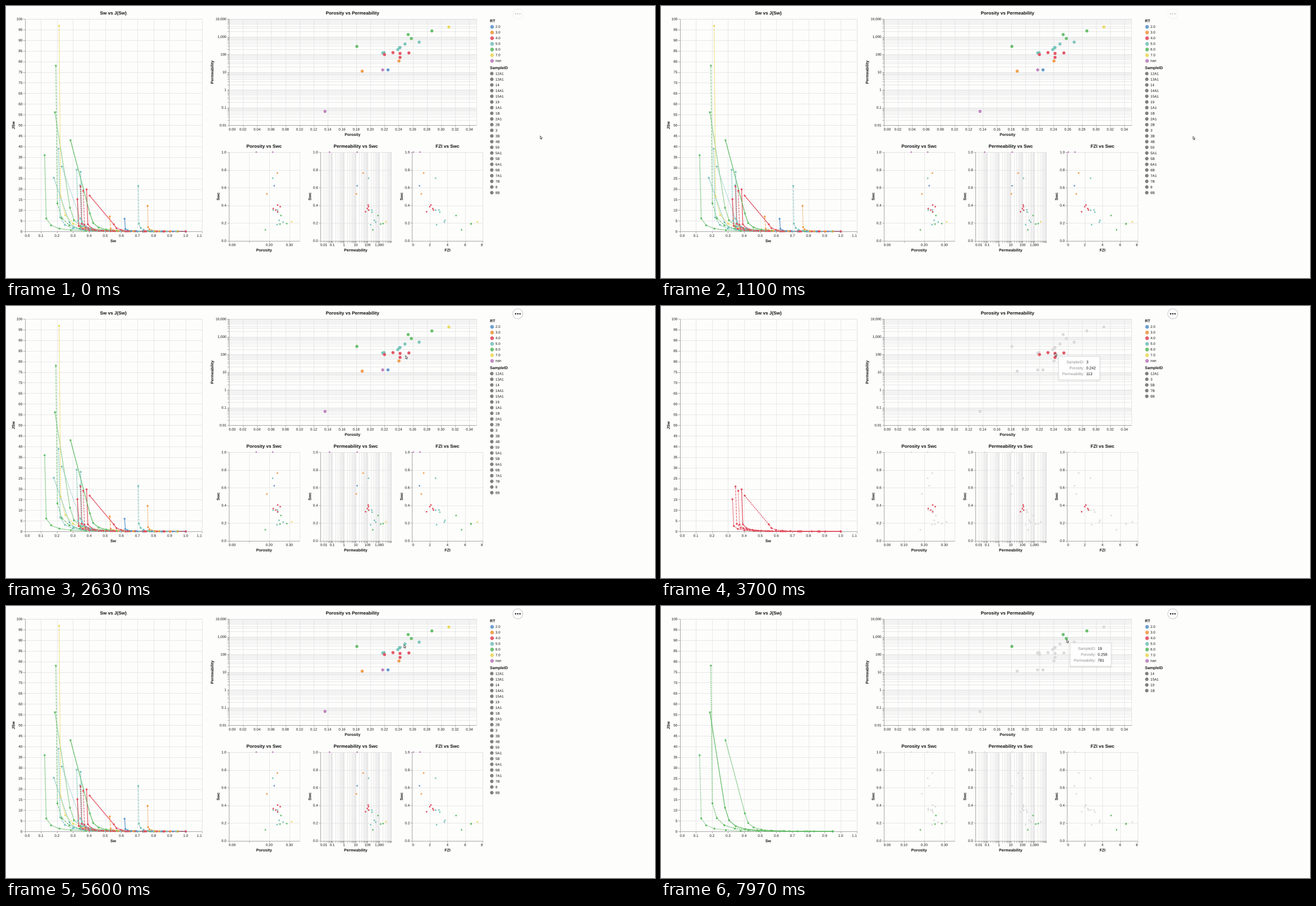
Recreate the animation shown at these times as a matplotlib script. Size 1156x484 px, loop 8000 ms.

```python
import math

import matplotlib.pyplot as plt
import numpy as np
from matplotlib.animation import FuncAnimation
from matplotlib.collections import PatchCollection
from matplotlib.patches import Circle, FancyBboxPatch, PathPatch, Polygon, Rectangle
from matplotlib.textpath import TextPath
from matplotlib.transforms import Affine2D

W, H, DPI = 1156, 484, 64
PX = 72 / DPI  # points per pixel
FRAMES, STEP = 200, 40
SCALE = 0.63  # chart units to pixels

plt.rcParams["lines.scale_dashes"] = False

COLORS = {"2.0": "#5f97cb", "3.0": "#f09a45", "4.0": "#e2505f", "5.0": "#78c4ba",
          "6.0": "#62bd66", "7.0": "#ecd95e", "nan": "#be82bd"}
MUTED = "#dadada"
DASHES = [(1, 0), (4, 2), (2, 1), (1, 1), (1, 2, 4, 2)]
SLANTED = {"3", "14", "19", "59", "4B"}  # curves without a vertical drop


class Sample:
    """A core plug; rock type and J curve follow from its three measurements."""

    def __init__(self, name, phi, perm, swc):
        self.name, self.phi, self.perm, self.swc = name, phi, perm, swc
        quality = math.sqrt(perm / phi)
        self.fzi = 0.0314 * quality * (1 - phi) / phi
        self.rt = "nan" if swc == 1 else f"{round(2 * math.log(self.fzi) + 10.6) - 8:.1f}"
        # Each pressure step roughly halves J while water fills the pores.
        k = np.arange(10)
        top = 0.78 if name.isdigit() else 0.912
        pressure = np.where(k == 0, top, 0.155 * 0.47 ** (k - 1.0))
        fill = (k / 9) ** 2
        if name in SLANTED:
            bend = 0.6 * swc
            fill = np.where(k == 0, 0, bend + (1 - bend) * fill)
        end = 0.95 if self.rt == "6.0" else 1
        self.sw = swc + (end - swc) * fill
        self.jsw = pressure * quality


SAMPLES = [
    Sample("12A1", .2545, 120, .384), Sample("13A1", .269, 490, .21),
    Sample("14", .2535, 1310, .187), Sample("14A1", .136, .06, 1),
    Sample("15A1", .287, 2100, .193), Sample("19", .258, 781, .284),
    Sample("1A1", .311, 3500, .213), Sample("1B", .181, 280, .123),
    Sample("2A1", .2175, 13.2, 1), Sample("2B", .1885, 11.2, .528),
    Sample("3", .242, 113, .403), Sample("3B", .242, 245, .322),
    Sample("4B", .2388, 183, .18), Sample("59", .249, 382, .23),
    Sample("5A1", .2175, 120, .705), Sample("5B", .242, 67, .327),
    Sample("6A1", .241, 228, .347), Sample("6B", .2195, 125, .344),
    Sample("7A1", .2405, 42, .763), Sample("7B", .22, 97, .363),
    Sample("8", .225, 13.2, .62), Sample("8B", .232, 125, .346),
]

fig = plt.figure(figsize=(W / DPI, H / DPI), dpi=DPI, facecolor="#fdfdfc")
ax = fig.add_axes((0, 0, 1, 1))


def clear_stage():
    ax.clear()
    ax.set(xlim=(0, W), ylim=(H, 0))
    ax.axis("off")


def label(x, y, text, size=6.3, ha="center", color="#111111", weight="normal",
          angle=0, zorder=5):
    """Outlined text with its capitals centred on y."""
    if not text:
        return
    path = TextPath((0, 0), text, size=size,
                    prop={"family": "Liberation Sans", "weight": weight})
    width = path.get_extents().x1 + 0.05 * size
    shift = {"left": 0, "center": width / 2, "right": width}[ha]
    place = (Affine2D().translate(-shift, -0.36 * size).scale(1, -1)
             .rotate_deg(-angle).translate(x, y))
    ax.add_patch(PathPatch(path, fc=color, lw=0, zorder=zorder, snap=False,
                           transform=place + ax.transData))


def heading(x, y, text, size=7, **style):
    label(x, y, text, size, weight="bold", **style)


def dots(xs, ys, radius, colors, edge="none", alpha=1, zorder=4):
    circles = [Circle(p, radius) for p in zip(np.atleast_1d(xs), np.atleast_1d(ys))]
    ax.add_collection(PatchCollection(circles, facecolors=colors, edgecolors=edge,
                                      linewidths=0.7 * PX, alpha=alpha, zorder=zorder))


def linear(top, step, fmt):
    count = int(top / step + 1e-6) + 1
    return [(k * step / top, fmt.format(k * step)) for k in range(count)]


def decades(last_label=True):
    ticks = [((d + 2 + math.log10(m)) / 6, f"{10.0 ** d:,g}" if m == 1 else "")
             for d in range(-2, 4) for m in range(1, 10)]
    return ticks + [(1, "10,000" if last_label else "")]


def log_share(perm):
    return (np.log10(perm) + 2) / 6


class Panel:
    def __init__(self, x0, y0, x1, y1):
        self.box = x0, y0, x1, y1

    def place(self, u, v):
        """Fractions of the panel to stage pixels."""
        x0, y0, x1, y1 = self.box
        return x0 + np.asarray(u) * (x1 - x0), y1 - np.asarray(v) * (y1 - y0)

    def draw(self, xticks, yticks, xname, yname, title=None, gap=19):
        x0, y0, x1, y1 = self.box
        xs = self.place([u for u, _ in xticks], 0)[0]
        ys = self.place(0, [v for v, _ in yticks])[1]
        grid = dict(colors="#e0e0e2", linewidths=0.7 * PX, zorder=1)
        axis = dict(colors="#909090", linewidths=0.7 * PX, zorder=2)
        ax.add_patch(Rectangle((x0, y0), x1 - x0, y1 - y0, fill=False,
                               ec="#e0e0e2", lw=0.7 * PX, zorder=1))
        ax.vlines(xs, y0, y1, **grid)
        ax.hlines(ys, x0, x1, **grid)
        ax.vlines(xs, y1, y1 + 3.2, **axis)
        ax.hlines(ys, x0 - 3.2, x0, **axis)
        ax.vlines(x0, y0, y1, **axis)
        ax.hlines(y1, x0, x1, **axis)
        for x, (u, text) in zip(xs, xticks):
            ha = "left" if u < 0.01 else "right" if u > 0.99 else "center"
            label(x, y1 + 7.3, text, ha=ha)
        for y, (_, text) in zip(ys, yticks):
            label(x0 - 4.2, y, text, ha="right")
        middle = (x0 + x1) / 2
        heading(middle, y0 - 10.7, title or f"{xname} vs {yname}", 8.2)
        heading(middle, y1 + 16.6, xname)
        heading(x0 - gap, (y0 + y1) / 2, yname, angle=90)


curves = Panel(33.5, 23, 348.8, 401.2)
cross = Panel(396.8, 23, 838, 212)
by_phi, by_perm, by_fzi = (Panel(x, 260, x + 126, 417.6) for x in (396.8, 560, 723.4))


def draw_curves(chosen):
    for i, s in enumerate(chosen):
        if s.swc == 1:
            continue
        dash = DASHES[i % len(DASHES)]
        style = "-" if dash[1] == 0 else (0, tuple(d * SCALE * PX for d in dash))
        x, y = curves.place(s.sw / 1.1, s.jsw / 100)
        ax.plot(x, y, color=COLORS[s.rt], lw=1.25 * PX, ls=style,
                dash_capstyle="butt", zorder=3)
        dots(x, y, 1.7, COLORS[s.rt])


def draw_legend(chosen):
    heading(862, 26.3, "RT", ha="left")
    for i, (rt, color) in enumerate(COLORS.items()):
        y = 36.6 + 10.1 * i
        dots(865.3, y, 2.9, color, edge=color, alpha=0.9)
        label(871.8, y, rt, ha="left")
    heading(862, 109.8, "SampleID", ha="left")
    for i, s in enumerate(chosen):
        y = 120.3 + 10.09 * i
        dots(865.3, y, 3.1, "#808080")
        label(871.8, y, s.name, ha="left")


def draw_dashboard(rt):
    """The whole page with one rock type picked out, or all of them."""
    chosen = [s for s in SAMPLES if rt in (None, s.rt)]
    phi_ticks = linear(0.35, 0.1, "{:.2f}")
    if rt is None:
        phi_ticks[1] = (phi_ticks[1][0], "")
    swc_ticks = linear(1, 0.2, "{:.1f}")
    curves.draw(linear(1.1, 0.1, "{:.1f}"), linear(100, 5, "{:.0f}"),
                "Sw", "JSw", title="Sw vs J(Sw)", gap=20.5)
    cross.draw(linear(0.35, 0.02, "{:.2f}"), decades(), "Porosity", "Permeability", gap=29.8)
    by_phi.draw(phi_ticks, swc_ticks, "Porosity", "Swc")
    by_perm.draw(decades(False), swc_ticks, "Permeability", "Swc")
    by_fzi.draw(linear(8, 2, "{:.0f}"), swc_ticks, "FZI", "Swc")

    # Muted samples go underneath the highlighted ones.
    shown = sorted(SAMPLES, key=lambda s: s in chosen)
    tint = [COLORS[s.rt] if s in chosen else MUTED for s in shown]
    phi, perm, swc, fzi = np.array([(s.phi, s.perm, s.swc, s.fzi) for s in shown]).T
    dots(*cross.place(phi / 0.35, log_share(perm)), 2.75, tint, alpha=0.95)
    dots(*by_phi.place(phi / 0.35, swc), 1.4, tint)
    dots(*by_perm.place(log_share(perm), swc), 1.4, tint)
    dots(*by_fzi.place(fzi / 8, swc), 1.4, tint)
    draw_curves(chosen)
    draw_legend(chosen)


def draw_button(strength):
    ax.add_patch(Circle((911.6, 13.9), 8.9, fc="white", ec="#bcbcbc",
                        alpha=strength, lw=0.8 * PX))
    dots([907.7, 911.6, 915.5], [13.9] * 3, 1.2, "black", alpha=strength)


def draw_pointer(x, y):
    shape = [(0, 0), (0, 5.4), (1.3, 4.3), (2.2, 6.3), (3.1, 5.9), (2.3, 4), (4, 3.8)]
    ax.add_patch(Polygon([(x + a, y + b) for a, b in shape], fc="white",
                         ec="#3c3c3c", lw=0.7 * PX, zorder=9))


def draw_tooltip(x, y, s):
    left, top, wide, high = x + 6.6, y + 6.3, 72.6, 41
    style = "round,pad=0,rounding_size=1.6"
    for grow in (2.4, 1.6, 0.8):
        ax.add_patch(FancyBboxPatch((left - grow, top - grow + 1), wide + 2 * grow,
                                    high + 2 * grow, boxstyle=style, fc="black",
                                    ec="none", alpha=0.025, zorder=6))
    ax.add_patch(FancyBboxPatch((left, top), wide, high, boxstyle=style, fc="#fefefe",
                                ec="#dedede", lw=0.6 * PX, zorder=7))
    rows = {"SampleID:": s.name, "Porosity:": f"{s.phi:g}", "Permeability:": f"{s.perm:g}"}
    for i, (key, value) in enumerate(rows.items()):
        row = top + 9.6 + 10.5 * i
        label(left + 45, row, key, 6.8, "right", "#8f8f8f", zorder=8)
        label(left + 48.8, row, value, 6.8, "left", zorder=8)


# Pointer stops: time, x, y.
STOPS = [(0, 951.3, 231), (1200, 947.5, 232), (1850, 743, 103), (2050, 743, 103),
         (2850, 702, 83.7), (3700, 702, 83.7), (5000, 708.5, 69), (5620, 708.5, 69),
         (5750, 712.5, 67.7), (6950, 712.5, 67.7), (7180, 722.5, 59.7), (8000, 722.5, 59.7)]


def pointer_at(t):
    """Glide from stop to stop, slowing down at each."""
    for (t0, *start), (t1, *end) in zip(STOPS, STOPS[1:]):
        if t < t1:
            u = (t - t0) / (t1 - t0)
            return np.array(start) + (np.array(end) - start) * u * u * (3 - 2 * u)


def sample_under(x, y):
    for s in SAMPLES:
        dot_x, dot_y = cross.place(s.phi / 0.35, log_share(s.perm))
        if math.hypot(x - dot_x, y - dot_y) < 2.2:
            return s
    return None


def snapshot(rt):
    clear_stage()
    draw_dashboard(rt)
    fig.canvas.draw()
    return np.array(fig.canvas.buffer_rgba())


# The dashboard has few states, so each is rendered once and reused.
pages = {rt: snapshot(rt) for rt in (None, *COLORS)}
backdrop = fig.figimage(pages[None], origin="upper", zorder=-1)


def draw(i):
    t = i * STEP
    x, y = pointer_at(t)
    hovered = sample_under(x, y)
    backdrop.set_data(pages[hovered.rt if hovered else None])
    clear_stage()
    draw_button(np.interp(t, (1450, 1800), (0.2, 1)))
    if hovered:
        draw_tooltip(x, y, hovered)
    draw_pointer(x, y)
    return []


anim = FuncAnimation(fig, draw, frames=FRAMES, interval=STEP, init_func=lambda: [],
                     repeat=True, repeat_delay=0, blit=False)
plt.show()
```
